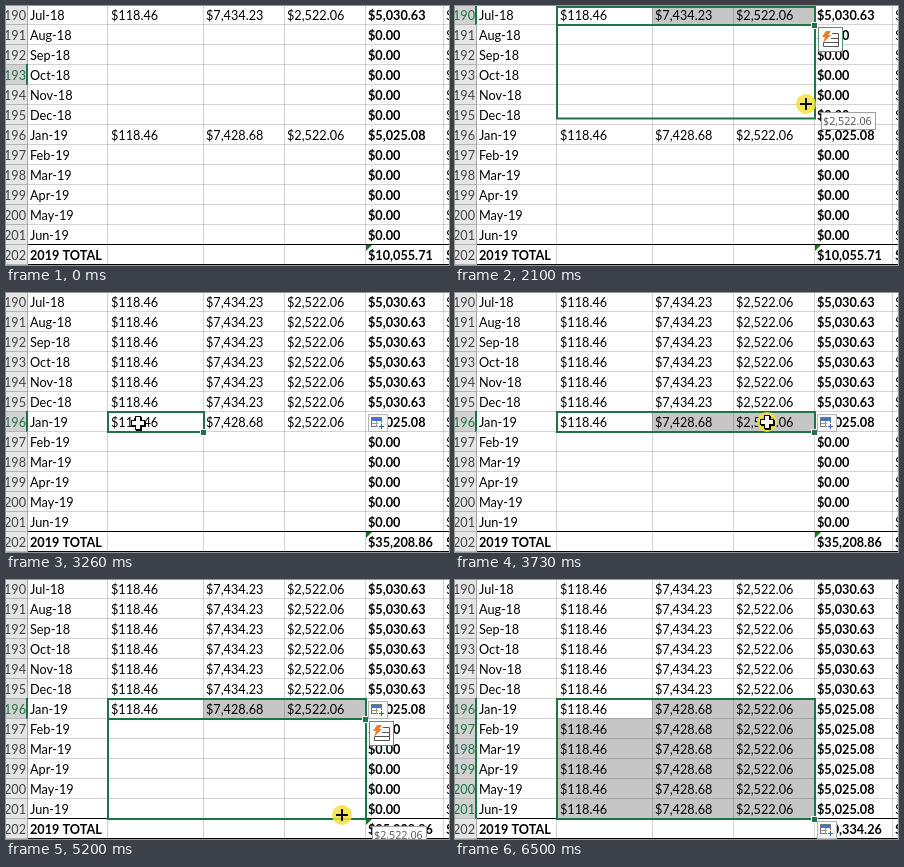
An HTML page with a canvas that plays this animation: 443 by 259 pixels, repeating every 7810 ms.

```html
<!DOCTYPE html>
<html lang="en">
<head>
<meta charset="utf-8">
<title>Filling spreadsheet rows</title>
<style>
html, body { margin: 0; width: 100%; height: 100%; overflow: hidden; background: #fff; }
canvas { display: block; }
</style>
</head>
<body>
<canvas id="stage" width="443" height="259"></canvas>
<script>
const ctx = document.getElementById('stage').getContext('2d');
const LOOP = 7810, TICK = 77.5;
const GREEN = '#217346', GRID = 'rgba(0,0,0,.17)';
const FONT = 'Lato, Carlito, sans-serif';
const MONTHS = ['Jul-18', 'Aug-18', 'Sep-18', 'Oct-18', 'Nov-18', 'Dec-18', 'Jan-19',
  'Feb-19', 'Mar-19', 'Apr-19', 'May-19', 'Jun-19', '2019 TOTAL'];
const EDGES = [101, 197, 278, 359, 437];
const VALUE_X = [105, 200, 281], SUM_X = 362;
const FILLS = [
  { start: 2430, first: 0, values: ['$118.46', '$7,434.23', '$2,522.06'], sum: '$5,030.63' },
  { start: 5412, first: 6, values: ['$118.46', '$7,428.68', '$2,522.06'], sum: '$5,025.08' }
];
const TOTALS = ['$10,055.71', '$35,208.86', '$60,334.26'];

// Pointer path: time, x, y
const PATH = [
  [150, 177, 2], [380, 132, 9], [550, 132, 9], [1160, 323, 12], [1330, 358, 17],
  [1630, 358, 17], [2170, 350, 111], [2400, 350, 111], [2710, 183, 139], [3180, 132, 130],
  [3260, 132, 130], [3720, 312, 129], [3880, 312, 129], [4040, 362, 140], [4650, 362, 140],
  [4805, 345, 197], [5200, 336, 236], [5620, 336, 236], [6040, 336, 231], [6270, 336, 231],
  [6480, 393, 231]
];
const PRESSES = [[550, 1100], [1630, 2400], [3260, 3800], [4260, 5412]];
const THIN = [[1390, 2400], [4260, 5700]];

const clamp = v => Math.max(0, Math.min(1, v));
const smooth = v => (v = clamp(v)) * v * (3 - 2 * v);
const within = (t, spans) => spans.find(([a, b]) => t >= a && t < b);
const rowTop = row => row * 20 - 2;

function box(x, y, w, h, color) {
  ctx.fillStyle = color;
  ctx.fillRect(x, y, w, h);
}

function text(str, x, y, color = '#000', style = '', size = 12.7, family = FONT) {
  ctx.font = `${style} ${size}px ${family}`;
  ctx.fillStyle = color;
  ctx.fillText(str, x, y);
}

function clipped(x, y, w, h, draw) {
  ctx.save();
  ctx.beginPath();
  ctx.rect(x, y, w, h);
  ctx.clip();
  draw();
  ctx.restore();
}

function panel(x, y, w, h, color, fill = '#fff') {
  box(x, y, w, h, color);
  box(x + 1, y + 1, w - 2, h - 2, fill);
}

function pointerAt(t) {
  const i = PATH.findIndex(p => p[0] > t);
  if (i < 1) return null;
  const [a, b] = [PATH[i - 1], PATH[i]], k = (t - a[0]) / (b[0] - a[0]);
  return { x: a[1] + (b[1] - a[1]) * k, y: a[2] + (b[2] - a[2]) * k };
}

// Selected rows and right-hand column of the selection
function selectionAt(t, pointer) {
  if (t < 540) return null;
  const reach = () => pointer.x > 278 ? 3 : pointer.x > 197 ? 2 : 1;
  if (t < FILLS[0].start) return { from: 0, to: 0, cols: t < 1160 ? reach() : 3 };
  if (t < 3250) return { from: 0, to: 5, cols: 3 };
  if (t < FILLS[1].start) return { from: 6, to: 6, cols: t < 3720 ? reach() : 3 };
  return { from: 6, to: 11, cols: 3 };
}

function drawHeaders(sel) {
  for (let r = 0; r < 13; r++) {
    const on = sel ? r >= sel.from && r <= sel.to : r === 3;
    box(0, rowTop(r) + 1, 21, 20, on ? '#d2d2d2' : '#e6e6e6');
    box(0, rowTop(r) + 20, 21, 1, '#b4b4b4');
    box(on ? 20 : 21, rowTop(r), on ? 2 : 1, 21, on ? GREEN : '#a6a6a6');
    text(190 + r, -2, r * 20 + 14, on ? GREEN : '#444');
  }
}

function drawGrid(sel) {
  if (sel) {
    const y = rowTop(sel.from) + 1, right = EDGES[sel.cols];
    box(101, y, right - 101, rowTop(sel.to + 1) - y, '#c6c6c6');
    box(102, y, 95, 19, '#fff');
  }
  for (let r = 1; r < 12; r++) box(22, rowTop(r), 421, 1, GRID);
  for (const x of EDGES) box(x, 0, 1, 259, GRID);
  box(22, 238, 421, 1, '#000');
  box(22, 258, 421, 1, '#000');
}

function drawValues(t) {
  for (const { start, first, values } of FILLS) {
    const bottom = rowTop(first + 1) + 100 * clamp((t - start) / 340);
    clipped(101, 0, 258, bottom, () => {
      for (let r = first; r < first + 6; r++)
        values.forEach((v, i) => text(v, VALUE_X[i], r * 20 + 14));
    });
  }
}

// A changed result drops in from above while the old one leaves below
function drawSum(row, before, after, t, start) {
  const shift = before === after ? 0 : 20 * (1 - clamp((t - start) / 300)) ** 3;
  const y = row * 20 + 14;
  clipped(360, rowTop(row) + 1, 83, 19, () => {
    for (const [str, dy] of [[before, 20 - shift], [after, -shift]]) {
      if (Math.abs(dy) >= 20) continue;
      text(str, SUM_X, y + dy, '#000', 'bold');
      text('$', 440, y + dy, '#000', row === 12 ? 'bold' : '');
    }
  });
}

function drawSums(t) {
  for (const { start, first, sum } of FILLS)
    for (let i = 0; i < 6; i++)
      drawSum(first + i, i ? '$0.00' : sum, sum, Math.max(t, start + (i ? 0 : 1)), start);
  const step = t < FILLS[1].start ? 0 : 1;
  drawSum(12, TOTALS[step], TOTALS[step + 1], t, FILLS[step].start);
  if (t < FILLS[0].start || (t > 3180 && t < FILLS[1].start)) {
    ctx.fillStyle = '#107c10';
    ctx.beginPath();
    ctx.moveTo(360, 239);
    ctx.lineTo(366, 239);
    ctx.lineTo(360, 245);
    ctx.fill();
  }
}

function outline(y0, y1, right) {
  ctx.strokeStyle = GREEN;
  ctx.lineWidth = 2;
  ctx.strokeRect(102, y0, right - 102, y1 - y0);
}

function drawSelection(sel, t) {
  if (!sel) return;
  const y0 = Math.max(1, rowTop(sel.from) + 1), y1 = rowTop(sel.to + 1) + 1;
  const right = EDGES[sel.cols] + 1;
  for (const [start, end, from] of [[1630, 2400, 0], [4650, FILLS[1].start, 6]])
    if (t >= start && t < end)
      outline(y0, rowTop(from + 1) + 1 + 100 * smooth((t - start - 15) / 530), right);
  outline(y0, y1, right);
  box(right - 4, y1 - 3, 7, 7, '#fff');
  box(right - 3, y1 - 2, 5, 5, GREEN);
}

function drawFillButton(y) {
  panel(362, y, 20, 18, '#b5b5b5', '#f7f7f7');
  panel(365, y + 3, 11, 10, '#777');
  box(366, y + 4, 9, 3, '#3f76c4');
  box(366, y + 9, 9, 1, '#999');
  box(370, y + 7, 1, 6, '#999');
  box(372, y + 9, 7, 7, '#f7f7f7');
  box(373, y + 12, 5, 1, '#2f66b4');
  box(375, y + 10, 1, 5, '#2f66b4');
}

function drawAnalysisButton(y) {
  panel(363, y, 25, 25, '#5f8f74');
  ctx.strokeStyle = '#555';
  ctx.lineWidth = 1;
  ctx.beginPath();
  ctx.moveTo(377, y + 6.5);
  ctx.lineTo(383.5, y + 6.5);
  ctx.lineTo(383.5, y + 19.5);
  ctx.lineTo(368.5, y + 19.5);
  ctx.lineTo(368.5, y + 15.5);
  ctx.lineTo(383, y + 15.5);
  ctx.moveTo(376, y + 11.5);
  ctx.lineTo(383, y + 11.5);
  ctx.stroke();
  ctx.fillStyle = '#ed7d31';
  ctx.beginPath();
  [[371, 4], [376, 4], [373, 8], [376, 8], [368, 16], [370, 10], [367, 10]]
    .forEach(([x, dy]) => ctx.lineTo(x, y + dy));
  ctx.fill();
}

function drawTooltip(pointer) {
  const row = Math.floor((pointer.y + 1) / 20);
  const y = rowTop(row + 1) + 8;
  panel(366, y, 55, 18, '#a0a0a0');
  text('$2,522.06', 368, y + 13, '#555', '', 10.8, '"Open Sans", sans-serif');
}

function plus(x, y, size, width, color) {
  box(x - size / 2, y - width / 2, size, width, color);
  box(x - width / 2, y - size / 2, width, size, color);
}

function drawPointer(t, pointer) {
  const x = Math.round(pointer.x), y = Math.round(pointer.y);
  const press = within(t, PRESSES);
  if (press) {
    ctx.fillStyle = 'rgba(244,224,56,.85)';
    ctx.beginPath();
    ctx.arc(x, y, 10 * clamp(.4 + (t - press[0]) / 250), 0, 7);
    ctx.fill();
  }
  if (within(t, THIN)) return plus(x, y, 12, 2, '#000');
  plus(x + 1, y + 1, 14, 6, '#000');
  plus(x, y, 14, 6, '#000');
  plus(x, y, 12, 4, '#fff');
}

function draw(t) {
  const pointer = pointerAt(t), sel = selectionAt(t, pointer);
  box(0, 0, 443, 259, '#fff');
  drawGrid(sel);
  drawHeaders(sel);
  MONTHS.forEach((m, r) => text(m, 24, r * 20 + 14, '#000', r === 12 ? 'bold' : ''));
  drawValues(t);
  drawSums(t);
  drawSelection(sel, t);
  if (t >= FILLS[0].start) drawFillButton(t < FILLS[1].start ? 121 : 241);
  if (within(t, [[1240, 2400]])) drawAnalysisButton(21);
  if (within(t, [[3960, FILLS[1].start]])) drawAnalysisButton(141);
  if (within(t, [[1700, 2400], [4720, FILLS[1].start]])) drawTooltip(pointer);
  if (pointer) drawPointer(t, pointer);
}

function loop(now) {
  draw(Math.floor((now % LOOP) / TICK + .15) * TICK);
  requestAnimationFrame(loop);
}
requestAnimationFrame(loop);
</script>
</body>
</html>
```
